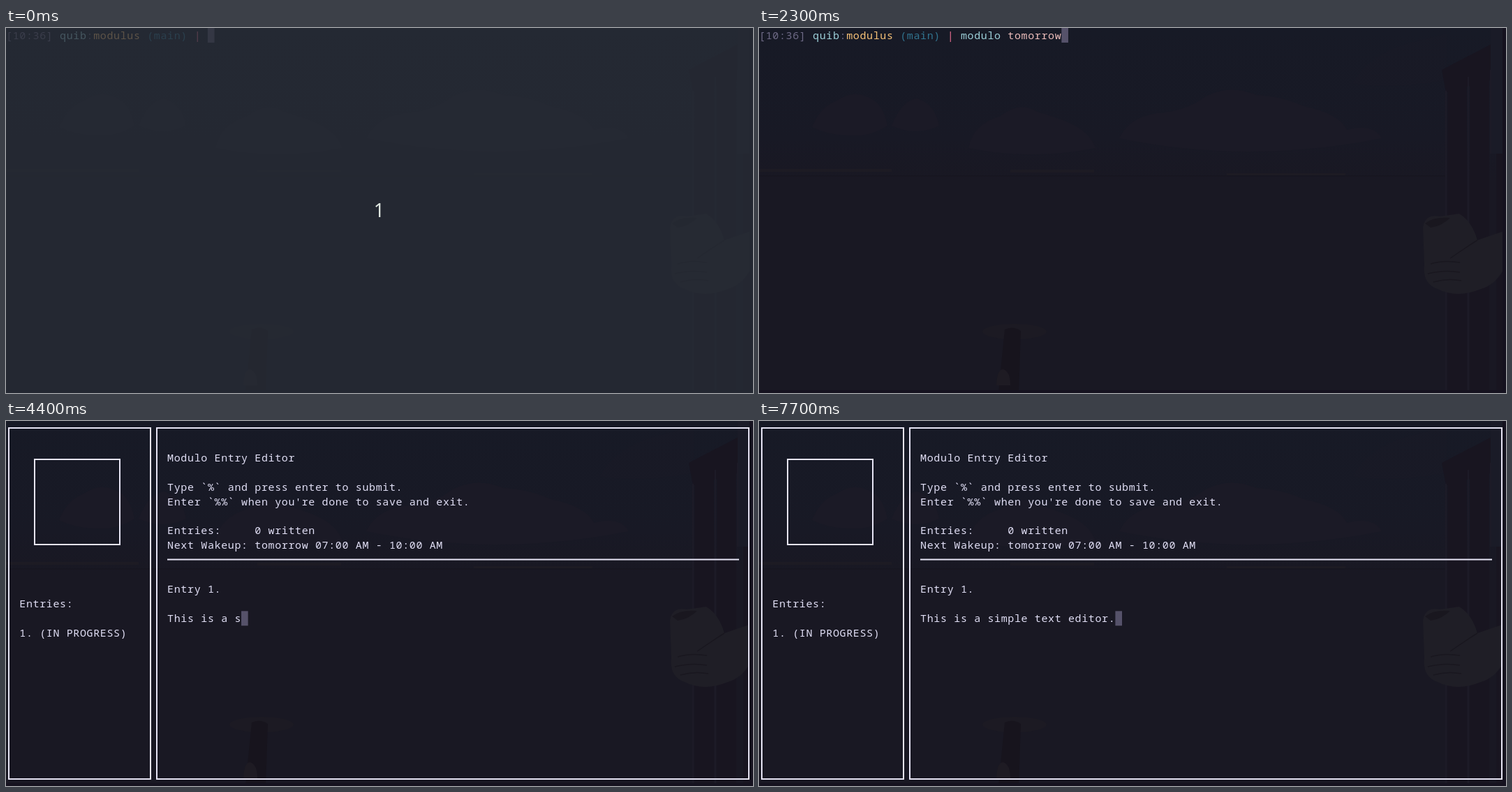
These frames come from a looping animation (1070x523 px, 8000 ms). An HTML page:

```html
<!DOCTYPE html>
<html lang="en">
<head>
<meta charset="utf-8">
<title>Entry editor</title>
<style>
  html, body { margin: 0; width: 100%; height: 100%; overflow: hidden; background: #191823; }
  svg { display: block; width: 1070px; height: 523px; }
  .term text {
    font: 15px "Noto Sans Mono", "DejaVu Sans Mono", monospace;
    letter-spacing: .63px;
    white-space: pre;
    fill: #e0def4;
  }
  .lines { fill: none; stroke: #e6e4f4; stroke-width: 2; }
  .cursor { fill: #56526a; }
</style>
</head>
<body>
<svg viewBox="0 0 1070 523">
  <defs>
    <linearGradient id="sky" x1="0" y1="0" x2="0" y2="1">
      <stop offset="0" stop-color="#171a26"/>
      <stop offset=".3" stop-color="#181925"/>
      <stop offset=".42" stop-color="#191823"/>
      <stop offset="1" stop-color="#191823"/>
    </linearGradient>
  </defs>

  <!-- dim wallpaper behind the terminal -->
  <rect width="1070" height="523" fill="url(#sky)"/>
  <g fill="#1b1a26">
    <path d="M76 142Q88 112 112 104Q132 90 150 97Q178 104 184 140Q160 156 130 154Q100 154 76 142Z"/>
    <path d="M190 140Q204 104 226 101Q252 108 258 140Q225 156 190 140Z"/>
    <path d="M300 172Q306 138 346 126Q374 104 398 120Q426 128 440 134Q474 148 482 172Q390 190 300 172Z"/>
    <path d="M516 158Q530 128 570 122Q610 120 640 98Q675 80 712 96Q750 98 780 112Q830 122 842 146Q880 136 892 158Q700 196 516 158Z"/>
    <path d="M850 80Q870 40 930 22L985 8V74Q920 88 850 80Z" opacity=".5"/>
  </g>
  <path d="M0 204H190M360 205H480M670 210H840" stroke="#201d24" stroke-width="4" opacity=".7"/>
  <path d="M0 212H984" stroke="#171620" stroke-width="2"/>
  <g fill="#181520">
    <path d="M978 60L1066 14V70L984 92Z"/>
    <path d="M986 84H1014V523H986ZM1018 66H1046V523H1018Z"/>
    <path d="M1056 180H1066V523H1056Z"/>
  </g>
  <path d="M1048 0H1066V180H1048Z" fill="#1a1b27"/>
  <path d="M984 90V523M1016 70V523M1048 60V180" stroke="#1d1b27" stroke-width="2" fill="none"/>
  <g fill="#1f1e26">
    <path d="M951 286Q954 266 975 270L1003 266Q1022 278 1029 304L1070 290V340Q1056 368 1034 374Q1000 388 972 374Q950 366 953 340Z"/>
    <path d="M954 280Q966 270 990 272Q978 284 962 286Z" fill="#19171f"/>
    <path d="M962 338Q980 332 1004 336M958 352Q982 346 1004 350M966 364Q986 358 1006 362M1029 304Q1010 316 990 330" fill="none" stroke="#19171f" stroke-width="1.5"/>
  </g>
  <ellipse cx="366" cy="435" rx="46" ry="11" fill="#1c1a23"/>
  <path d="M352 432Q364 426 375 434L372 523H343Z" fill="#17141d"/>
  <path d="M340 512Q341 488 350 489Q360 492 360 512Z" fill="#1e1b23"/>
  <path d="M0 519H1065V0H1070V523H0Z" fill="#15121f"/>

  <g class="term">
    <g id="shell"></g>
    <g id="editor">
      <path class="lines" d="M4 10H207V513H4ZM216 10H1064V513H216ZM231 198.5H1050"/>
      <rect class="lines" x="41" y="55" width="122" height="122"/>
    </g>
  </g>

  <g id="countdown">
    <rect width="1070" height="523" fill="#292e37" fill-opacity=".75"/>
    <text x="534.5" y="271" text-anchor="middle" font-family="Noto Sans, Open Sans, sans-serif" font-size="27" fill="#dfe6e0">1</text>
  </g>
</svg>
<script>
const start = performance.now();
const LOOP = 8000, COL = 9.63, ROW = 20.95, BASE = 15.8;
const COUNT_END = 100, EDITOR_START = 2500;
const COMMAND = "modulo tomorrow", NAME_LEN = 6, PROMPT_COL = 30;
const ENTRY = "This is a simple text editor.", ENTRY_COL = 24, ENTRY_ROW = 13;

// Keystroke bursts: [time of first key, number of keys], 100 ms apart.
const keys = bursts => bursts.flatMap(([t, n]) => Array.from({ length: n }, (_, i) => t + i * 100));
const shellKeys = keys([[500, 2], [800, 2], [1100, 2], [1400, 6], [2100, 3]]);
const entryKeys = keys([
  [3100, 4], [3600, 4], [4100, 2], [4400, 1], [4600, 2], [4900, 2], [5200, 1], [5400, 1],
  [5600, 1], [5800, 1], [6000, 1], [6200, 1], [6400, 2], [6800, 1], [7000, 4], [7700, 1]
]);

const $ = id => document.getElementById(id);
const shell = $("shell"), editor = $("editor"), countdown = $("countdown");

function add(parent, tag, attrs = {}, text = "") {
  const el = document.createElementNS("http://www.w3.org/2000/svg", tag);
  for (const k in attrs) el.setAttribute(k, attrs[k]);
  el.textContent = text;
  return parent.appendChild(el);
}
function write(parent, col, row, text = "", color = "#e0def4") {
  const el = add(parent, "text", { x: col * COL, y: row * ROW + BASE }, text);
  el.style.fill = color;
  return el;
}
const addCursor = (parent, row) =>
  add(parent, "rect", { class: "cursor", y: row * ROW, width: COL, height: ROW });

[
  [0, "[10:36]", "#6e6a86"], [8, "quib", "#9ccfd8"], [12, ":", "#6e6a86"],
  [13, "modulus", "#f6c177"], [21, "(main)", "#31748f"], [28, "|", "#eb6f92"]
].forEach(([col, text, color]) => write(shell, col, 0, text, color));
const shellCursor = addCursor(shell, 0);
const nameText = write(shell, PROMPT_COL, 0);
const argText = write(shell, PROMPT_COL + NAME_LEN, 0, "", "#ebbcba");
const underCursor = write(shell, 0, 0);
const hintText = write(shell, 0, 0, "", "#53515a");

[
  [24, 2, "Modulo Entry Editor"],
  [24, 4, "Type `%` and press enter to submit."],
  [24, 5, "Enter `%%` when you're done to save and exit."],
  [24, 7, "Entries:     0 written"],
  [24, 8, "Next Wakeup: tomorrow 07:00 AM - 10:00 AM"],
  [24, 11, "Entry 1."],
  [2, 12, "Entries:"],
  [2, 14, "1. (IN PROGRESS)"]
].forEach(line => write(editor, ...line));
const entryCursor = addCursor(editor, ENTRY_ROW);
const entryText = write(editor, ENTRY_COL, ENTRY_ROW);

const typed = (times, t) => times.filter(k => k <= t).length;
const show = (el, on) => { el.style.display = on ? "" : "none"; };
const moveTo = (el, col) => el.setAttribute("x", col * COL);

function drawShell(n) {
  const col = PROMPT_COL + n;
  nameText.textContent = COMMAND.slice(0, Math.min(n, NAME_LEN));
  nameText.style.fill = n < NAME_LEN ? "#eb6f92" : "#9ccfd8";
  argText.textContent = COMMAND.slice(NAME_LEN, Math.max(n, NAME_LEN));
  underCursor.textContent = n ? COMMAND.slice(n, n + 1) : "";
  hintText.textContent = n ? COMMAND.slice(n + 1) : "";
  moveTo(shellCursor, col);
  moveTo(underCursor, col);
  moveTo(hintText, col + 1);
}
function drawEntry(n) {
  entryText.textContent = ENTRY.slice(0, n);
  moveTo(entryCursor, ENTRY_COL + n);
}
function render() {
  const t = (performance.now() - start) % LOOP;
  show(countdown, t < COUNT_END);
  show(shell, t < EDITOR_START);
  show(editor, t >= EDITOR_START);
  drawShell(typed(shellKeys, t));
  drawEntry(typed(entryKeys, t));
  requestAnimationFrame(render);
}
render();
</script>
</body>
</html>
```
